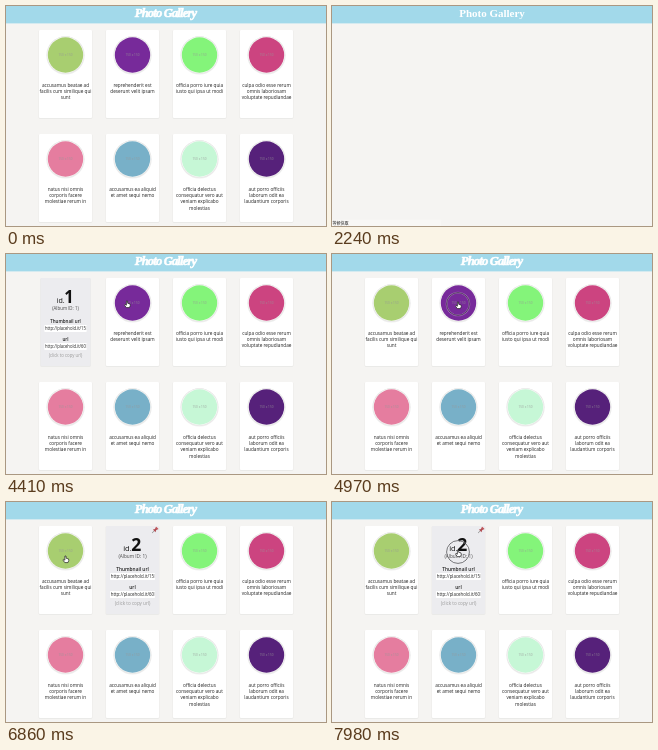
Recreate the animation shown at these times as an HTML page with a canvas. Size 320 px wide and 220 px high, loop 8 s.

```html
<!DOCTYPE html>
<html lang="en">
<head>
<meta charset="utf-8">
<title>Photo Gallery</title>
<style>
html, body { margin: 0; width: 100%; height: 100%; overflow: hidden; background: #f5f4f2; }
canvas { display: block; width: 320px; height: 220px; }
</style>
</head>
<body>
<canvas id="stage"></canvas>
<script>
const W = 320, H = 220, LOOP = 8000;
const SANS = '"Open Sans", "Noto Sans", sans-serif';
const SERIF = '"Liberation Serif", serif';
const canvas = document.getElementById('stage');
const ctx = canvas.getContext('2d');
const dpr = window.devicePixelRatio || 1;
canvas.width = W * dpr;
canvas.height = H * dpr;

const CARD_W = 53, CARD_H = 88;
const cards = [
  ['#a8ce70', 'accusamus beatae ad|facilis cum similique qui|sunt'],
  ['#772a9a', 'reprehenderit est|deserunt velit ipsam'],
  ['#84f47a', 'officia porro iure quia|iusto qui ipsa ut modi'],
  ['#cc4480', 'culpa odio esse rerum|omnis laboriosam|voluptate repudiandae'],
  ['#e57d9f', 'natus nisi omnis|corporis facere|molestiae rerum in'],
  ['#78b0c8', 'accusamus ea aliquid|et amet sequi nemo'],
  ['#c6f7d6', 'officia delectus|consequatur vero aut|veniam explicabo|molestias'],
  ['#56217a', 'aut porro officiis|laborum odit ea|laudantium corporis'],
].map(([color, text], i) => ({
  id: i + 1, color, lines: text.split('|'),
  x: 33 + (i % 4) * 67, y: 24 + Math.floor(i / 4) * 104,
}));

const UNLOAD = 2240, READY = 2660, PINNED = 5530;
// card id: [flip start, flip back start]
const flips = { 1: [3640, 4325], 2: [5030, Infinity] };
const FLIP_MS = 420;
const clicks = [[3600, 3780], [4900, 5110], [5460, 5640], [7910, 8090]];
// time, x, y of the pointer tip
const path = [
  [3360, 8, 222], [3430, 17, 188], [3500, 40, 98], [3570, 51, 53], [4150, 52, 52],
  [4410, 121, 47], [4700, 126, 48], [5880, 126, 48], [6440, 24, 57],
  [6650, 24, 57], [6860, 59.5, 54], [7200, 60, 54], [7560, 126, 48], [8000, 126, 48],
];

const clamp = v => Math.max(0, Math.min(1, v));
const smooth = v => { v = clamp(v); return v * v * (3 - 2 * v); };

function write(str, x, y, size, opt = {}) {
  ctx.font = `${opt.style || ''} ${opt.weight || 400} ${size}px ${opt.family || SANS}`;
  ctx.textAlign = opt.align || 'center';
  ctx.letterSpacing = opt.spacing || '0px';
  ctx.fillStyle = opt.color || '#222';
  ctx.fillText(str, x, y);
}

function box(x, y, w, h, r, fill) {
  ctx.fillStyle = fill;
  ctx.beginPath();
  ctx.roundRect(x, y, w, h, r);
  ctx.fill();
}

function disc(x, y, r, fill) {
  ctx.fillStyle = fill;
  ctx.beginPath();
  ctx.arc(x, y, r, 0, Math.PI * 2);
  ctx.fill();
}

function shape(points, fill, stroke, width) {
  ctx.beginPath();
  points.forEach(([x, y]) => ctx.lineTo(x, y));
  ctx.closePath();
  ctx.fillStyle = fill;
  ctx.fill();
  if (!stroke) return;
  ctx.strokeStyle = stroke;
  ctx.lineWidth = width;
  ctx.lineJoin = 'round';
  ctx.stroke();
}

function header(loading) {
  ctx.fillStyle = '#a2d9ea';
  ctx.fillRect(0, 0, W, 17.4);
  if (loading) {
    write('Photo Gallery', 160, 11, 11, { weight: 700, family: SERIF, color: '#fff' });
    return;
  }
  write('Photo Gallery', 159.5, 11, 12.6, {
    style: 'italic', weight: 700, family: SERIF, color: '#fff', spacing: '-0.85px',
  });
  ctx.strokeStyle = '#fff';
  ctx.lineWidth = 0.6;
  ctx.strokeText('Photo Gallery', 159.5, 11);
}

function statusBar() {
  box(-2, 213.5, 111, 8, 1, '#f8f7f5');
  write('等候快取', 0.5, 219, 4, { align: 'left', family: '"Noto Sans CJK TC", "Noto Sans CJK SC", sans-serif' });
}

// Faces are drawn with x = 0 on the card's centre line.
function front(card, load) {
  box(-CARD_W / 2, 0, CARD_W, CARD_H, 1, '#fff');
  ctx.save();
  ctx.globalAlpha = load;
  disc(0, 25.4, 19.2, 'rgba(0,0,0,.07)');
  disc(0, 25, 18.7, '#e6e6e4');
  disc(0, 25, 18.2, '#fafafa');
  disc(0, 25, 17.7, card.color);
  write('150 x 150', 0, 26.2, 3.1, { color: 'rgba(150,150,150,.85)' });
  ctx.restore();
  card.lines.forEach((line, i) => write(line, 0, 56.8 + i * 6.3, 4.7));
}

function field(y, url) {
  const left = -22.5, width = 45;
  box(left, y, width, 7, 0.8, '#fff');
  ctx.save();
  ctx.beginPath();
  ctx.rect(left, y, width - 0.6, 7);
  ctx.clip();
  write(url, left + 0.8, y + 5, 4.4, { align: 'left' });
  ctx.restore();
}

function pin(x, y) {
  ctx.save();
  ctx.translate(x, y);
  ctx.rotate(Math.PI / 4);
  ctx.scale(0.8, 0.8);
  ctx.fillStyle = '#888';
  ctx.fillRect(-0.35, 1, 0.7, 4);
  shape([[-1.3, -3.4], [1.3, -3.4], [1.3, -0.6], [2.4, 1.2], [-2.4, 1.2], [-1.3, -0.6]], '#b04a50');
  box(-2.1, -4.3, 4.2, 1.4, 0.6, '#c4585c');
  ctx.restore();
}

function back(card, pinned) {
  box(-CARD_W / 2, 0, CARD_W, CARD_H, 1, '#ececef');
  write('id.', -9.3, 24.8, 7.5, { align: 'left', color: '#111' });
  write(card.id, -1.2, 24.8, 17.5, { align: 'left', weight: 700, color: '#111' });
  write('(Album ID: 1)', 0, 31.6, 4.7, { color: '#444' });
  write('Thumbnail url', 0, 45, 4.8, { weight: 600 });
  field(47, 'http://placehold.it/150');
  write('url', 0, 63, 4.8, { weight: 600 });
  field(65, 'http://placehold.it/600');
  write('(click to copy url)', 0, 78.6, 4.6, { color: '#999' });
  if (pinned) pin(22.4, 4.2);
}

function flipAmount(id, t) {
  if (!flips[id]) return 0;
  const [start, end] = flips[id];
  return smooth((t - start) / FLIP_MS) - smooth((t - end) / FLIP_MS);
}

function drawCard(card, t) {
  const turn = Math.cos(flipAmount(card.id, t) * Math.PI);
  const load = t < UNLOAD ? 1 : smooth((t - READY - 70) / 350);
  ctx.save();
  ctx.translate(card.x + CARD_W / 2, card.y);
  ctx.scale(Math.max(0.02, Math.abs(turn)), 1);
  box(-CARD_W / 2 - 0.5, 0.2, CARD_W + 1, CARD_H + 0.7, 1.4, 'rgba(0,0,0,.045)');
  if (turn >= 0) front(card, load);
  else back(card, card.id === 2 && t >= PINNED);
  ctx.restore();
}

function pointerAt(t) {
  const n = path.findIndex(p => p[0] > t);
  if (n < 1) return null;
  const [t0, x0, y0] = path[n - 1], [t1, x1, y1] = path[n];
  const k = t < 3570 ? (t - t0) / (t1 - t0) : smooth((t - t0) / (t1 - t0));
  return [x0 + (x1 - x0) * k, y0 + (y1 - y0) * k];
}

function drawPointer(t) {
  const at = pointerAt(t);
  if (!at) return;
  const [x, y] = at;
  const over = cards.some(c => x > c.x && x < c.x + CARD_W && y > c.y && y < c.y + CARD_H);
  ctx.save();
  ctx.translate(x, y);
  if (over) {
    shape([[-0.6, 0], [0.5, 0], [0.7, 2.3], [3, 2.9], [3.3, 4.4], [2.5, 6.6],
      [-0.7, 6.6], [-2.6, 4], [-2, 3.3], [-0.6, 4.2]], '#fff', '#222', 0.7);
  } else {
    shape([[0, 0], [0, 6], [1.4, 4.8], [2.4, 6.9], [3.3, 6.5], [2.4, 4.5], [4.2, 4.4]], '#111', '#fff', 0.5);
  }
  ctx.restore();

  const click = clicks.find(([a, b]) => t >= a && t < b);
  if (!click) return;
  const r = 9.4 + 2 * clamp((t - click[0]) / 70);
  for (const [width, color] of [[1.8, 'rgba(255,255,255,.3)'], [0.8, 'rgba(45,45,50,.8)']]) {
    ctx.beginPath();
    ctx.arc(x, y + 2, r, 0, Math.PI * 2);
    ctx.lineWidth = width;
    ctx.strokeStyle = color;
    ctx.stroke();
  }
}

function draw(t) {
  const loading = t >= UNLOAD && t < READY;
  ctx.setTransform(dpr, 0, 0, dpr, 0, 0);
  ctx.fillStyle = '#f5f4f2';
  ctx.fillRect(0, 0, W, H);
  header(loading);
  if (!loading) cards.forEach(card => drawCard(card, t));
  if (t >= 1960 && t < 2310) statusBar();
  drawPointer(t);
}

const began = performance.now();
function tick() {
  draw((performance.now() - began) % LOOP);
  requestAnimationFrame(tick);
}
tick();
</script>
</body>
</html>
```
